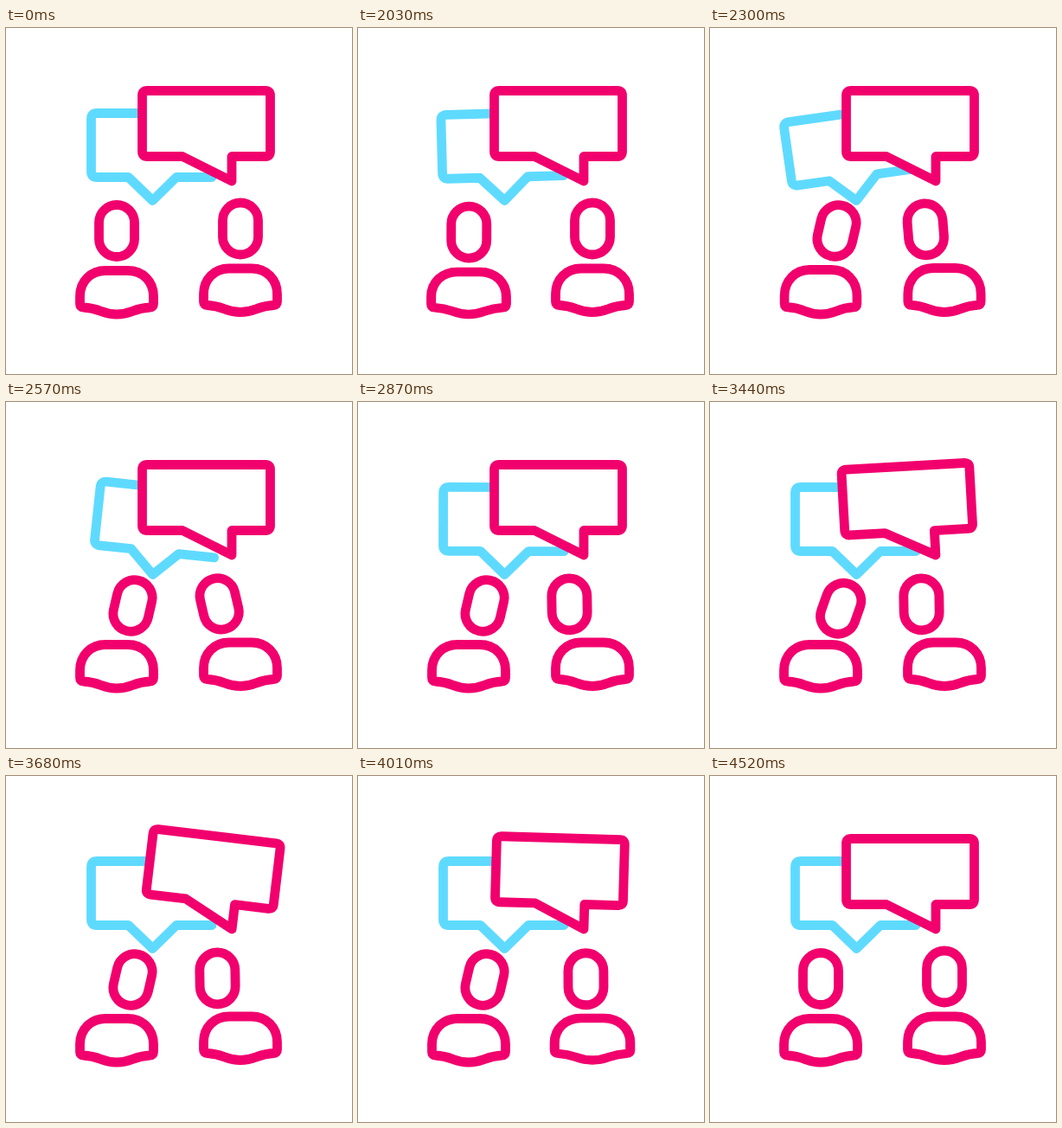
An HTML page that plays this animation: 400x400 px, repeating every 4550 ms.

```html
<!DOCTYPE html>
<html lang="en">
<head>
<meta charset="utf-8">
<title>Conversation</title>
<style>
  html, body { margin: 0; width: 100%; height: 100%; overflow: hidden; background: #fff; }
  svg { display: block; width: 100vw; height: 100vh; }
  g { fill: none; stroke: #f1006d; stroke-width: 10.8; stroke-linecap: round; stroke-linejoin: round; }
  #blue { stroke: #5fdaff; }
  #pink { fill: #fff; }
</style>
</head>
<body>
<svg viewBox="0 0 400 400">
  <defs>
    <rect id="head" x="-20.5" y="-30" width="41" height="60" rx="20.5"/>
    <path id="body" d="M-42.5-12V-21C-42.5-38-30-50.5-13-50.5H13C30-50.5 42.5-38 42.5-21V-12Q42.5-8 38.5-8C18-7 18 0 0 0S-18-7-38.5-8Q-42.5-8-42.5-12Z"/>
  </defs>
  <g>
    <path id="blue" d="M190 98.5H105Q98.5 98.5 98.5 105V166Q98.5 172.5 105 172.5H141.5L169.5 199.5 197 172.5H238"/>
    <path id="pink" d="M163 72.5H300Q305.5 72.5 305.5 78V143Q305.5 148.5 300 148.5H261V177L204 148.5H163Q157.5 148.5 157.5 143V78Q157.5 72.5 163 72.5Z"/>
    <use id="bodyL" href="#body"/>
    <use id="bodyR" href="#body"/>
    <use id="headL" href="#head"/>
    <use id="headR" href="#head"/>
  </g>
</svg>
<script>
const LOOP = 4550, STEP = 30, HOLD = 2030;

// lean and nod are offsets [x, y, tilt] of the head.
const people = {
  L: { x: 128, headY: 234.5, footY: 331, enter: 2010, leave: 4050, nodAt: 3306,
       lean: [18.5, 1, 13], nod: [8, 5.5, 11] },
  R: { x: 271, headY: 232, footY: 328.5, enter: 2100, leave: 3872, nodAt: 2497,
       lean: [-26.5, 1.8, -1], nod: [2.5, -0.5, -14] }
};

const move = (id, transform) => document.getElementById(id).setAttribute('transform', transform);
const part = (t, start, length) => Math.min(1, Math.max(0, (t - start) / length));
const ease = u => (1 - Math.cos(Math.PI * u)) / 2;

// Two full swings that die out.
function swing(id, start, x, y, t) {
  const u = part(t, start, 1095);
  const angle = -25 * (1 - u) * Math.sin(4 * Math.PI * u ** 1.13);
  move(id, `rotate(${angle} ${x} ${y})`);
}

// Squash, then a weaker stretch.
function bounce(t, start) {
  const u = part(t, start, 370);
  return Math.sin(2 * Math.PI * u) * (1 - u);
}

function person(side, t) {
  const p = people[side];
  const k = bounce(t, p.enter) + bounce(t, p.leave);
  const lean = ease(part(t, p.enter, 270)) - ease(part(t, p.leave, 215));
  const nod = Math.sin(Math.PI * part(t, p.nodAt - 300, 600)) ** 2;
  const [dx, dy, tilt] = p.lean.map((v, i) => v * lean + p.nod[i] * nod);
  move('body' + side, `translate(${p.x} ${p.footY}) scale(${1 + 0.065 * k} ${1 - 0.09 * k})`);
  move('head' + side, `translate(${p.x + dx} ${p.headY + dy + 5 * k}) rotate(${tilt})`);
}

function draw(now) {
  let t = now % LOOP;
  t = t < HOLD ? 0 : HOLD + Math.floor((t - HOLD) / STEP) * STEP;
  swing('blue', 2020, 169.5, 201, t);
  swing('pink', 3135, 261, 178, t);
  person('L', t);
  person('R', t);
}

const start = performance.now();
function tick() {
  draw(performance.now() - start);
  requestAnimationFrame(tick);
}
tick();
</script>
</body>
</html>
```
